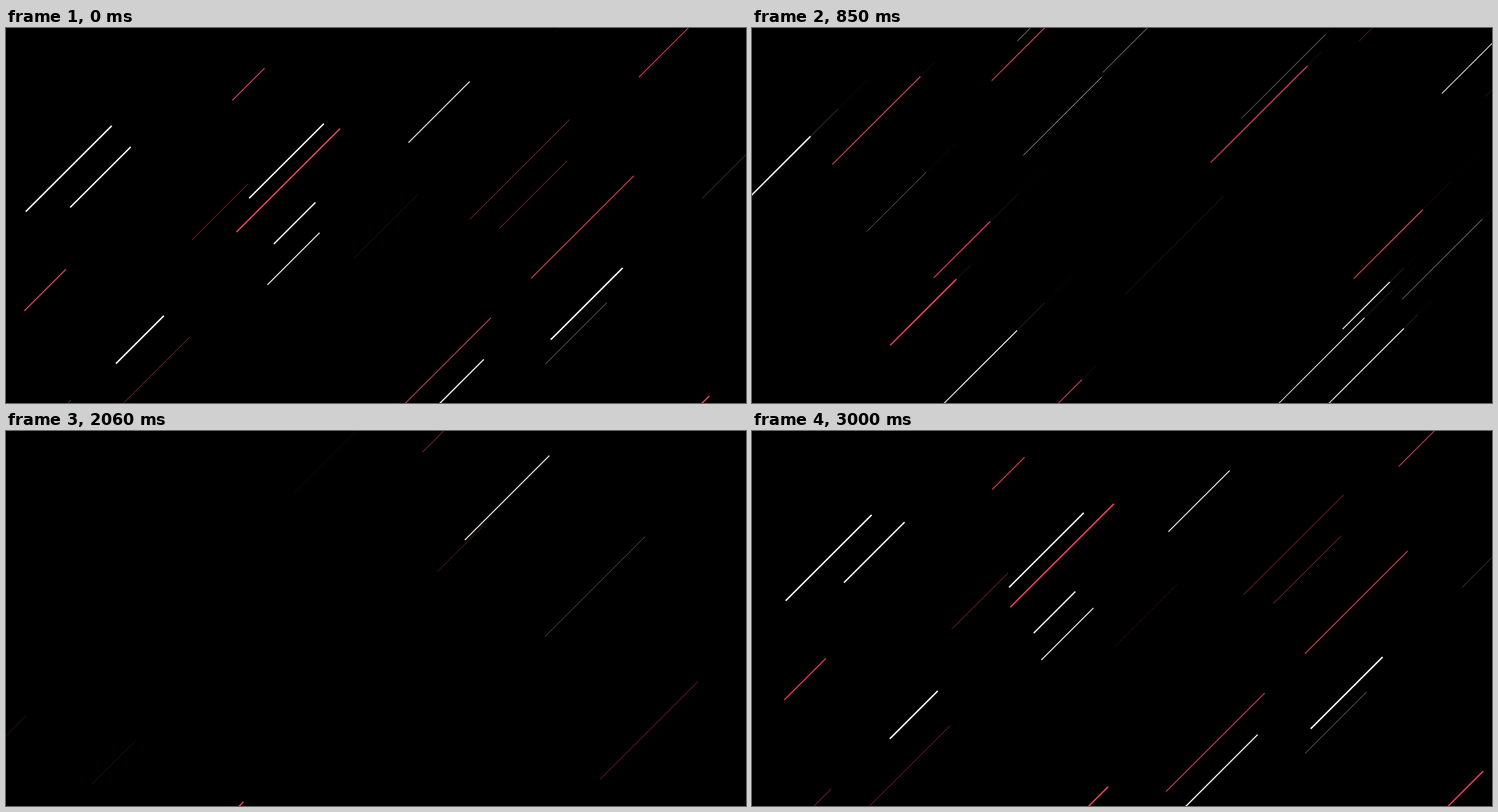
Recreate the animation shown at these times as an HTML page with a canvas. Size 1050 px wide and 533 px high, loop 3030 ms.

```html
<!DOCTYPE html>
<html lang="en">
<head>
<meta charset="utf-8">
<title>Falling streaks</title>
<style>
html, body { margin: 0; width: 100%; height: 100%; overflow: hidden; background: #000; }
canvas { display: block; }
</style>
</head>
<body>
<canvas id="stage" width="1050" height="533"></canvas>
<script>
const ctx = document.getElementById('stage').getContext('2d');
const LOOP = 3030, PATH = 1975, SLOW = PATH / 100, FAST = PATH / 50;
const WHITE = '#fffffa', RED = '#e64155';
const FAINT = 10;

let seed = 7;
function random(low, high) {
  seed = (seed * 16807) % 2147483647;
  return low + (high - low) * seed / 2147483647;
}

// Key streaks, boldest first: x + y of the diagonal, head y at the start, length
const groups = [
  { color: WHITE, speed: SLOW, keys: [
    [1216, 443, 102], [289, 261, 122], [587, 242, 106], [687, 307, 59],
    [602, -600, 67], [1266, -125, 67], [403, -30, 81], [1352, -6, 120],
    [734, 163, 87], [518, -640, 114]
  ] },
  { color: RED, speed: SLOW, keys: [
    [647, -102, 94], [1351, 210, 67], [1348, -1154, 120], [864, -733, 83],
    [428, 402, 59], [842, -362, 137], [308, -359, 125], [415, -478, 140],
    [424, 103, 46], [968, 70, 123]
  ] },
  { color: WHITE, speed: FAST, keys: [
    [237, -852, 100], [633, 477, 68], [346, 255, 86], [1062, 849, 93],
    [1149, 578, 107], [1217, 36, 64], [806, -556, 120], [736, 365, 74],
    [1072, -1013, 142], [1281, -559, 135]
  ] },
  { color: RED, speed: FAST, keys: [
    [617, 290, 147], [1011, 663, 118], [1521, 623, 100], [613, -751, 80],
    [1210, -750, 98], [1354, 202, 150], [1101, 356, 146], [1100, 552, 140]
  ] }
];

// Weight tapers along each group: line width above 1, opacity below
const streaks = groups.flatMap(({ color, speed, keys }) => {
  const bold = keys.map(([sum, start, length], i) =>
    ({ color, speed, sum, start, length, weight: 2.2 - 1.1 * i / (keys.length - 1) }));
  const faint = Array.from({ length: FAINT }, (_, i) => ({
    color, speed,
    sum: Math.round(random(100, 1500)),
    start: random(0, PATH),
    length: random(50, 150),
    weight: .7 - .6 * i / (FAINT - 1)
  }));
  return bold.concat(faint);
});

const mod = (a, n) => ((a % n) + n) % n;

function drawStreak({ color, speed, sum, start, length, weight }, step, share) {
  const head = mod(start + speed * step, PATH), tail = head - length;
  ctx.strokeStyle = color;
  ctx.lineWidth = Math.max(1, weight);
  ctx.globalAlpha = Math.min(1, weight) * share;
  ctx.beginPath();
  ctx.moveTo(sum - head, head);
  ctx.lineTo(sum - tail, tail);
  ctx.stroke();
}

// How much of the previous steps lingers: swells and fades early in the loop
function lingerAt(step) {
  return .3 * Math.max(0, Math.min(step / 12, (36 - step) / 24));
}

function draw(now) {
  const step = Math.floor((now % LOOP + 5) * .033) % 100;
  const linger = lingerAt(step);
  const shares = [1 - linger, linger * (1 - linger), linger * linger];
  ctx.globalCompositeOperation = 'source-over';
  ctx.globalAlpha = 1;
  ctx.fillStyle = '#000';
  ctx.fillRect(0, 0, 1050, 533);
  ctx.globalCompositeOperation = 'lighter';
  shares.forEach((share, age) => {
    if (share) for (const streak of streaks) drawStreak(streak, step - age, share);
  });
  requestAnimationFrame(draw);
}
requestAnimationFrame(draw);
</script>
</body>
</html>
```
